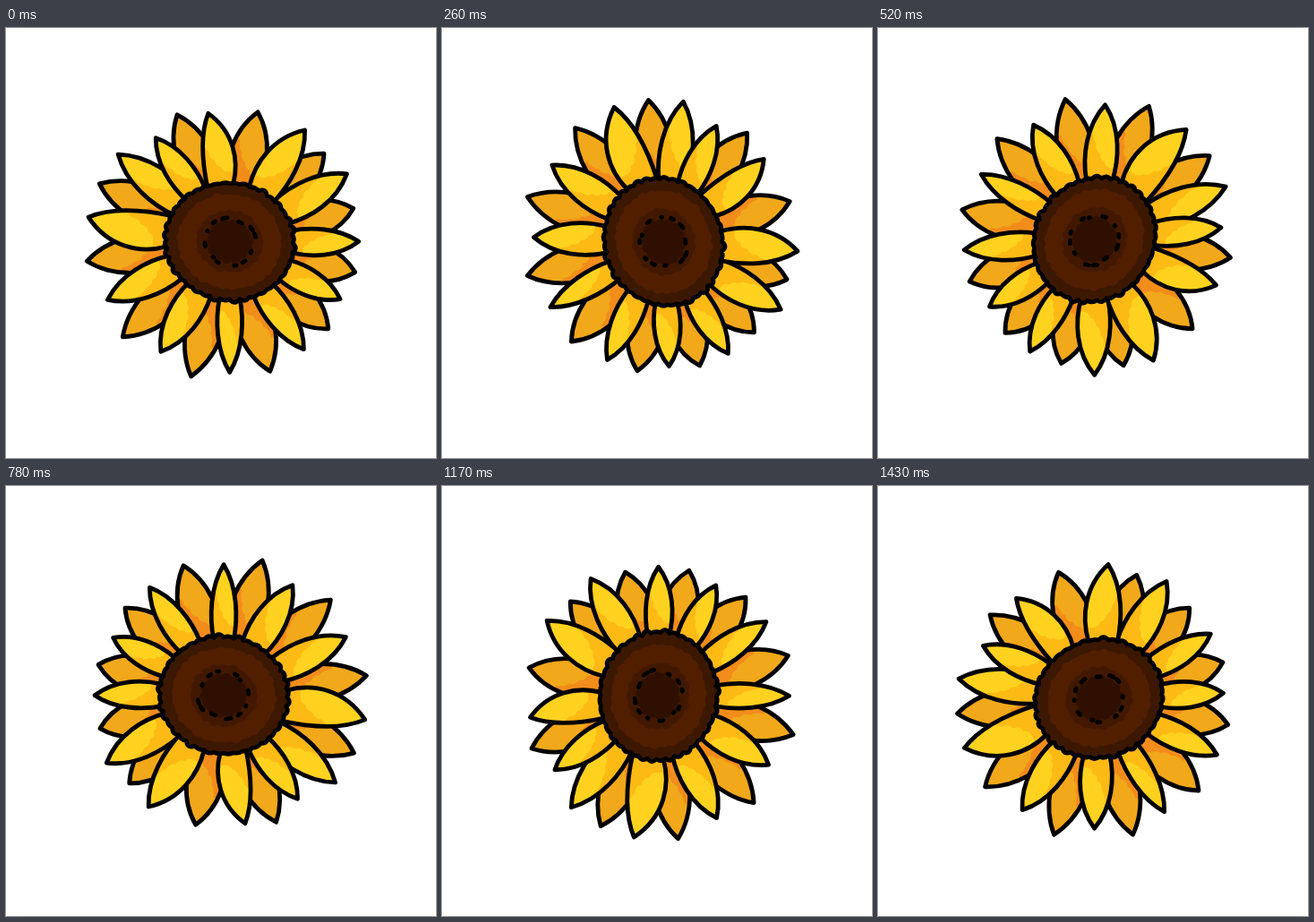
Write an HTML page with a canvas that moves like this. It is 480 by 480 pixels and loops after 1.56 s.

```html
<!DOCTYPE html>
<html lang="en">
<head>
<meta charset="utf-8">
<title>Sunflower</title>
<style>
  html, body { margin: 0; width: 100%; height: 100%; overflow: hidden; background: #fff; }
  canvas { display: block; width: 480px; height: 480px; }
</style>
</head>
<body>
<canvas id="stage" width="480" height="480"></canvas>
<script>
const ctx = document.getElementById('stage').getContext('2d');
const STEP = 130, STEPS = 12;
const RX = 73, RY = 66.5, TILT = 10;
const rad = deg => deg * Math.PI / 180;
const cosd = deg => Math.cos(rad(deg));

// Front petals: angle in degrees, reach from the centre, width, sideways bend
const front = [
  [-125.5, 143, 31, 0], [-99.5, 146, 36, 5], [-56, 151, 40, -3], [-30, 152, 37, 1],
  [0, 145, 30, 1], [27.5, 140, 30, 0], [55.5, 147, 31, 0], [90, 147, 28, 0],
  [122, 146, 36, 0], [154.5, 152, 36, 0], [189.8, 161, 43, -6], [218, 159, 37, 0]
];

// A back petal fills each gap except the narrow one between last and first
const back = front.slice(1).map(([angle], i) => {
  const mid = (front[i][0] + angle) / 2;
  return [mid, 153 + 9 * cosd(mid - 165), 42, 0];
});

function seeded(s) {
  return () => {
    s = (s * 1664525 + 1013904223) >>> 0;
    return s / 4294967296;
  };
}

function petal([angle, reach, w, bend], fill, shade, depth) {
  const a = angle - TILT;
  const root = .93 / Math.hypot(cosd(a) / RX, Math.sin(rad(a)) / RY);
  const len = reach - root - 1;

  const shape = new Path2D();
  shape.moveTo(0, -.4 * w);
  shape.bezierCurveTo(.3 * len, -.57 * w + bend, .7 * len, -.55 * w + bend, len, 0);
  shape.bezierCurveTo(.7 * len, .55 * w + bend, .3 * len, .57 * w + bend, 0, .4 * w);

  ctx.save();
  ctx.rotate(rad(angle));
  ctx.translate(root, 0);

  ctx.save();
  ctx.clip(shape);
  ctx.fillStyle = fill;
  ctx.fillRect(-4, -w, len + 8, 2 * w);
  ctx.scale(len * depth, bend < 0 ? -w : w);
  ctx.fillStyle = shade;
  ctx.beginPath();
  ctx.moveTo(-.1, -1);
  ctx.lineTo(1, -1);
  ctx.lineTo(1, -.3);
  ctx.quadraticCurveTo(.82, -.3, .74, -.18);
  ctx.quadraticCurveTo(.6, -.2, .55, -.04);
  ctx.quadraticCurveTo(.42, -.04, .4, .12);
  ctx.quadraticCurveTo(.3, .14, .28, .3);
  ctx.lineTo(.2, 1);
  ctx.lineTo(-.1, 1);
  ctx.fill();
  ctx.restore();

  ctx.stroke(shape);
  ctx.restore();
}

// Closed outline made of small uneven bumps
function lumpy(scale, bumps, height, rnd) {
  const turn = 2 * Math.PI / bumps;
  const at = (t, out) => [Math.cos(t) * (RX * scale + out), Math.sin(t) * (RY * scale + out)];
  ctx.beginPath();
  ctx.moveTo(...at(0, 0));
  for (let i = 0; i < bumps; i++) {
    const top = height * (.4 + 1.2 * rnd());
    ctx.quadraticCurveTo(...at((i + .5) * turn, top), ...at((i + 1) * turn, 0));
  }
  ctx.closePath();
}

function drawDisc() {
  const rnd = seeded(97);
  ctx.rotate(rad(TILT));
  lumpy(.97, 40, 5, rnd);
  ctx.fillStyle = '#3d1800';
  ctx.fill();
  ctx.stroke();

  [[.78, 30, '#511f00'], [.5, 20, '#421900'], [.34, 14, '#2f1000']].forEach(([r, n, color]) => {
    lumpy(r, n, 4, rnd);
    ctx.fillStyle = color;
    ctx.fill();
  });

  const dots = 12;
  for (let i = 0; i < dots; i++) {
    const t = (i + .6 * rnd()) / dots * 2 * Math.PI;
    const r = .36 + .05 * rnd();
    ctx.beginPath();
    ctx.ellipse(0, 0, RX * r, RY * r, 0, t, t + .02 + .18 * rnd());
    ctx.stroke();
  }
}

// The flower turns in equal steps while its centre wanders a little
function drawFlower(step) {
  const turn = step * 360 / STEPS;
  const x = 244.5 + 3.5 * cosd(turn - 18) + 2.3 * cosd(2 * turn - 36);
  const y = 236 + 2.9 * cosd(turn - 36);

  ctx.fillStyle = '#fff';
  ctx.fillRect(0, 0, 480, 480);
  ctx.strokeStyle = '#000';
  ctx.lineCap = ctx.lineJoin = 'round';
  ctx.lineWidth = 4.8;

  ctx.save();
  ctx.translate(x, y);
  ctx.rotate(rad(turn));
  back.forEach(p => petal(p, '#f1a81a', '#f28c1b', .6));
  [...front].reverse().forEach(p => petal(p, '#ffd21f', '#fdba14', .65));
  drawDisc();
  ctx.restore();
}

let shown = -1;
const start = performance.now();
function tick() {
  const step = Math.floor((performance.now() - start) / STEP) % STEPS;
  if (step !== shown) drawFlower(shown = step);
  requestAnimationFrame(tick);
}
tick();
</script>
</body>
</html>
```
